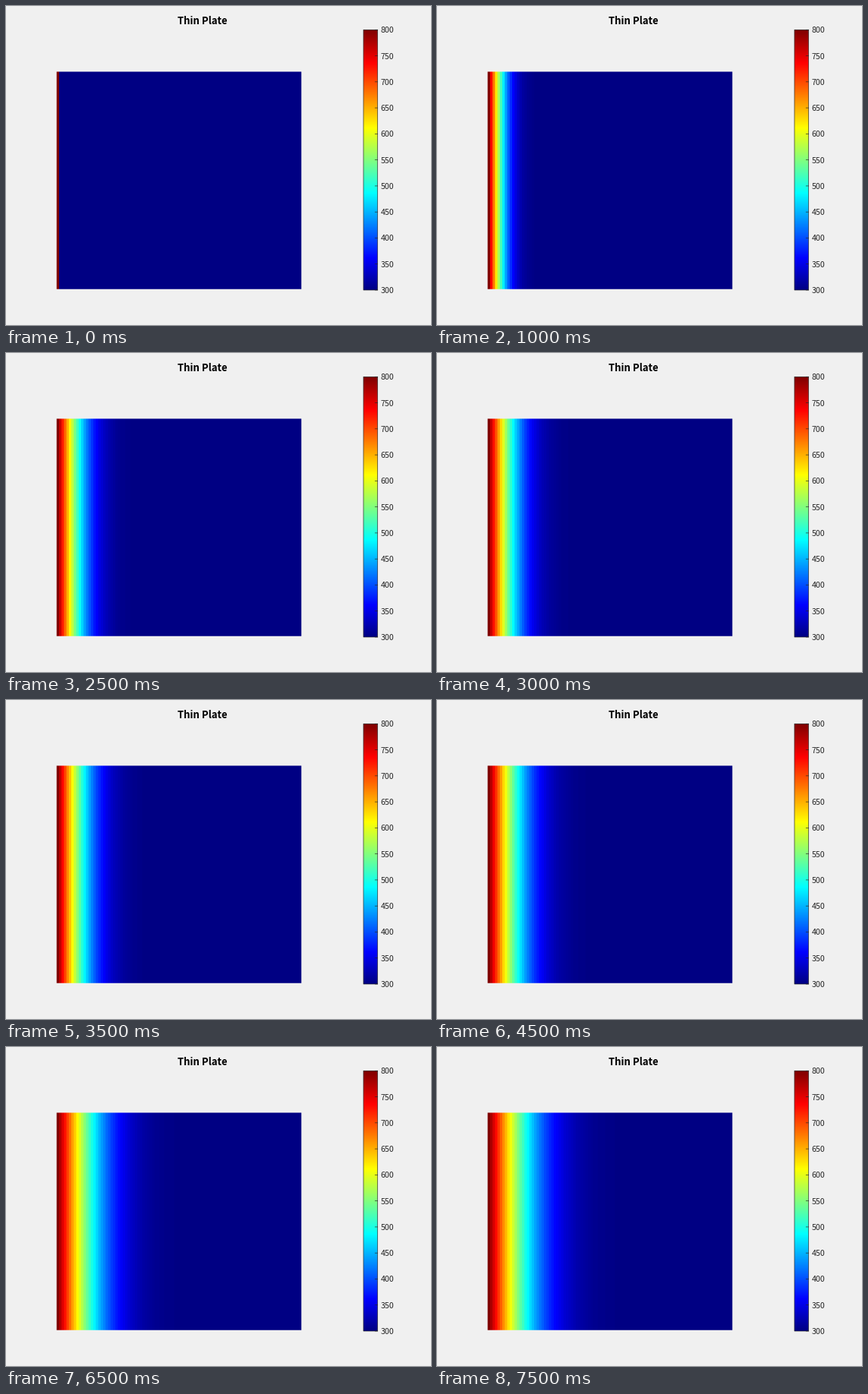
Recreate the animation shown at these times as a matplotlib script. Size 560x420 px, loop 8000 ms.

```python
import numpy as np
import matplotlib.pyplot as plt
from matplotlib.animation import FuncAnimation
from matplotlib.colors import ListedColormap
from matplotlib.patches import Rectangle

W, H, DPI = 560, 420, 100
COLD, HOT = 300, 800
CELLS, FRAMES, INTERVAL = 100, 16, 500
RATE, STEPS = 0.25, 42  # diffusion number and solver steps per frame
INK, PAPER = "#262626", "#f0f0f0"
FONT = "Noto Sans CJK JP"


def px(size):
    return size * 72 / DPI


def jet(n=256):
    """Trapezoid-ramped rainbow from dark blue to dark red."""
    i = np.arange(1, n + 1)
    q = n / 4

    def ramp(shift):
        return np.clip(np.minimum(i - shift, shift + 3 * q - i) / q, 0, 1)

    return ListedColormap(np.column_stack([ramp(1.5 * q), ramp(q / 2), ramp(-q / 2)]))


def solve():
    """Temperature rows of a plate heated on its left edge, one per frame."""
    temp = np.full(CELLS, float(COLD))
    temp[0] = HOT
    rows = [temp.copy()]
    for _ in range(FRAMES - 1):
        for _ in range(STEPS):
            temp[1:-1] += RATE * (temp[2:] - 2 * temp[1:-1] + temp[:-2])
            temp[-1] = temp[-2]
        rows.append(temp.copy())
    return rows


def coverage(start, stop, n):
    """Share of each whole pixel covered by each of n equal cells."""
    pixels = np.arange(np.floor(start), np.ceil(stop))[:, None]
    edges = np.linspace(start, stop, n + 1)
    return np.clip(np.minimum(pixels + 1, edges[1:])
                   - np.maximum(pixels, edges[:-1]), 0, 1)


cmap = jet()
rows = solve()


def colours(temps):
    return cmap((temps - COLD) / (HOT - COLD))[:, :3]


def smooth(temps, across, down):
    """Anti-aliased RGBA picture of vertical strips."""
    share = across.sum(axis=1, keepdims=True)
    rgb = across @ colours(temps) / share
    out = np.ones((len(down), len(across), 4))
    out[..., :3] = rgb
    out[..., 3] = down * share.T
    return out


fig = plt.figure(figsize=(W / DPI, H / DPI), dpi=DPI, facecolor=PAPER)
ax = fig.add_axes([0, 0, 1, 1])
ax.axis("off")


def image(data, left, top):
    h, w = data.shape[:2]
    return ax.imshow(data, extent=(left, left + w, top + h, top),
                     aspect="auto", interpolation="nearest")


# Plate
across = coverage(66.7, 389.2, CELLS)
down = coverage(86.5, 372.75, 1)
plate = image(smooth(rows[0], across, down), 66, 86)

# Colour bar
L, R, T, B = 471, 489.7, 31.3, 374
bar = smooth(np.linspace(HOT, COLD, 256), coverage(T, B, 256), coverage(L, R, 1))
image(bar.transpose(1, 0, 2), 471, 31)
ax.add_patch(Rectangle((L, T), R - L, B - T, fill=False, ec=INK,
                       lw=px(0.67), snap=False))
for value in range(COLD, HOT + 1, 50):
    y = B - (value - COLD) / (HOT - COLD) * (B - T)
    ax.plot([R - 3.4, R], [y, y], color=INK, lw=px(0.67), snap=False)
    ax.text(493.7, y + 4, str(value), size=px(10.7), color=INK,
            family=FONT, va="baseline")

ax.text(258.7, 24, "Thin Plate", size=px(13.1), weight="bold", color="black",
        family=FONT, ha="center", va="baseline")
ax.set_xlim(0, W)
ax.set_ylim(H, 0)


def update(k):
    plate.set_data(smooth(rows[k], across, down))
    return [plate]


anim = FuncAnimation(fig, update, frames=FRAMES, interval=INTERVAL,
                     repeat=True, repeat_delay=0, blit=False)
plt.show()
```
